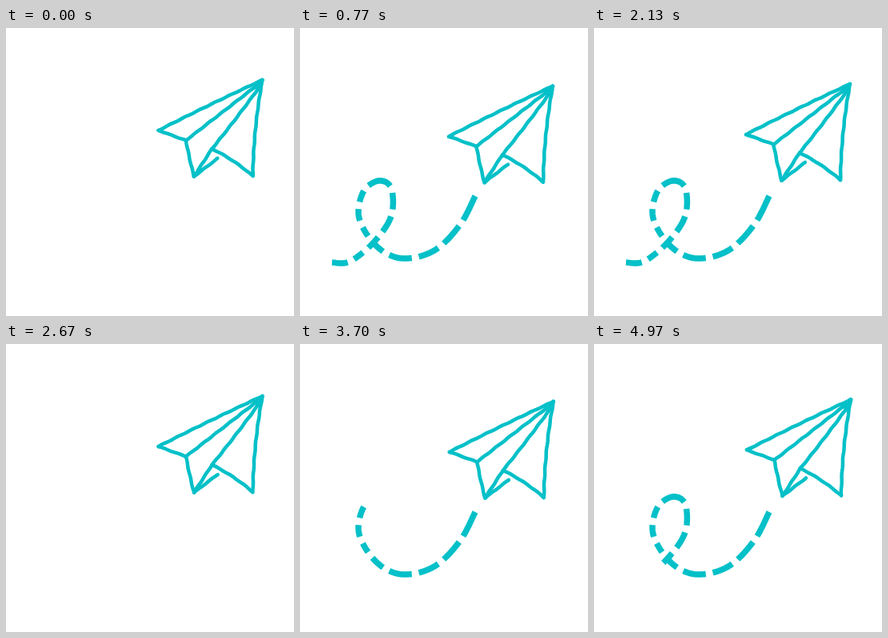
Recreate the animation shown at these times as an HTML page with a canvas. Size 360 px wide and 360 px high, loop 5000 ms.

```html
<!DOCTYPE html>
<html lang="en">
<head>
<meta charset="utf-8">
<title>Paper plane</title>
<style>
html, body { margin: 0; width: 100%; height: 100%; overflow: hidden; background: #fff; }
canvas { display: block; width: 360px; height: 360px; }
</style>
</head>
<body>
<canvas id="stage" width="360" height="360"></canvas>
<script>
const ctx = document.getElementById('stage').getContext('2d');
const COLOR = '#04c0c8';
const FPS = 30, FRAMES = 150, LOOP = 5000;
const DRIFT_CYCLE = 81, TRAIL_CYCLE = DRIFT_CYCLE / 2;
const SPEED = 48.5, ERASE_AT = 26.4;

const plane = {
  tip: [320, 70], left: [190, 133], notch: [224.5, 145.5], keel: [234.5, 190.5],
  fold: [257, 156], right: [308, 190], tail: [264, 168]
};

// Frame, x and y offset of the whole plane
const drift = [[0, 0.5, -5], [15, -4, -1.5], [23, -4, 2.5], [47, 0, -0.5],
               [64, 0, 0], [68, 1, -0.5], [81, 0.5, -5]];

const route = [[40, 293], [62, 292], [92, 268], [114, 235], [114, 200], [98, 191], [79, 205],
               [74, 238], [96, 273], [128, 288], [168, 278], [200, 246], [219, 210]];
const dashLengths = [20, 14, 18, 22, 21, 31, 15, 15, 13, 18, 29, 27, 29, 34];
const GAP = 9;

const clamp = (v, a, b) => Math.min(b, Math.max(a, v));
const mix = (a, b, u) => a + (b - a) * u;
const between = (a, b, u) => a.map((v, i) => mix(v, b[i], u));
const shift = ([x, y], dx, dy) => [x + dx, y + dy];

function spline(a, b, c, d, u) {
  return b.map((v, i) => v + u / 2 * (c[i] - a[i] +
    u * (2 * a[i] - 5 * v + 4 * c[i] - d[i] + u * (3 * (v - c[i]) + d[i] - a[i]))));
}

// Points along the route, each with its distance from the start
function trace(points, steps = 24) {
  const path = [[...points[0], 0]];
  for (let i = 0; i < points.length - 1; i++) {
    const [a, b, c, d] = [i - 1, i, i + 1, i + 2].map(n => points[clamp(n, 0, points.length - 1)]);
    for (let s = 1; s <= steps; s++) {
      const [x, y] = spline(a, b, c, d, s / steps);
      const [px, py, dist] = path[path.length - 1];
      path.push([x, y, dist + Math.hypot(x - px, y - py)]);
    }
  }
  return path;
}

const path = trace(route);
const pathLength = path[path.length - 1][2];
const dashTotal = dashLengths.reduce((sum, n) => sum + n + GAP, -GAP);
const dashScale = pathLength / dashTotal;

function pointAt(dist) {
  const i = Math.max(1, path.findIndex(p => p[2] >= dist));
  const a = path[i - 1], b = path[i];
  return between(a, b, (dist - a[2]) / (b[2] - a[2])).slice(0, 2);
}

function driftAt(phase) {
  const i = drift.findIndex(k => k[0] > phase);
  const a = drift[i - 1], b = drift[i];
  const u = (phase - a[0]) / (b[0] - a[0]);
  return between(a, b, u * u * (3 - 2 * u)).slice(1);
}

// Slightly uneven stroke; bow pushes its middle to the right of its direction
function stroke(a, b, bow, seed) {
  const dx = b[0] - a[0], dy = b[1] - a[1], len = Math.hypot(dx, dy);
  const steps = Math.ceil(len / 4);
  ctx.beginPath();
  for (let i = 0; i <= steps; i++) {
    const u = i / steps;
    const side = bow * 4 * u * (1 - u) + 0.3 * Math.sin(u * len * 0.3 + seed);
    ctx.lineTo(a[0] + dx * u - dy / len * side, a[1] + dy * u + dx / len * side);
  }
  ctx.stroke();
}

function drawPlane(seed) {
  const { tip, left, notch, keel, fold, right, tail } = plane;
  const inner = shift(tip, -2, 3), lower = shift(tip, -1, 5);
  const line = (a, b, bow = 0) => stroke(a, b, bow, seed);
  ctx.lineWidth = 4.5;
  ctx.lineCap = ctx.lineJoin = 'round';
  line(left, tip, -0.7);
  line(left, notch);
  line(notch, inner);
  line(notch, keel, 0.5);
  line(keel, fold);
  line(fold, lower, 0.7);
  line(fold, right, -2);
  line(tip, right, 2.5);
  line(keel, tail);
  ctx.beginPath();
  [tip, between(inner, notch, 0.08), between(lower, fold, 0.06)].forEach(p => ctx.lineTo(...p));
  ctx.closePath();
  ctx.fill();
  ctx.stroke();
}

function drawTrail(phase) {
  const head = Math.min(pathLength, phase * SPEED);
  const cut = Math.max(0, (phase - ERASE_AT) * SPEED);
  ctx.lineWidth = 7.5;
  ctx.lineCap = 'butt';
  let dist = 0;
  for (const length of dashLengths) {
    const from = Math.max(dist, cut), to = Math.min(dist + length * dashScale, head);
    dist += (length + GAP) * dashScale;
    if (to <= from) continue;
    ctx.beginPath();
    for (let i = 0; i <= 10; i++) ctx.lineTo(...pointAt(mix(from, to, i / 10)));
    ctx.stroke();
  }
}

function draw(ms) {
  const frame = Math.floor((ms % LOOP) * FPS / 1000 + 0.2) % FRAMES;
  const phase = frame % DRIFT_CYCLE;
  ctx.fillStyle = '#fff';
  ctx.fillRect(0, 0, 360, 360);
  ctx.fillStyle = ctx.strokeStyle = COLOR;
  drawTrail(frame % TRAIL_CYCLE);
  ctx.save();
  ctx.translate(...driftAt(phase));
  drawPlane(phase * 0.9);
  ctx.restore();
}

const start = performance.now();
function tick() {
  draw(performance.now() - start);
  requestAnimationFrame(tick);
}
tick();
</script>
</body>
</html>
```
